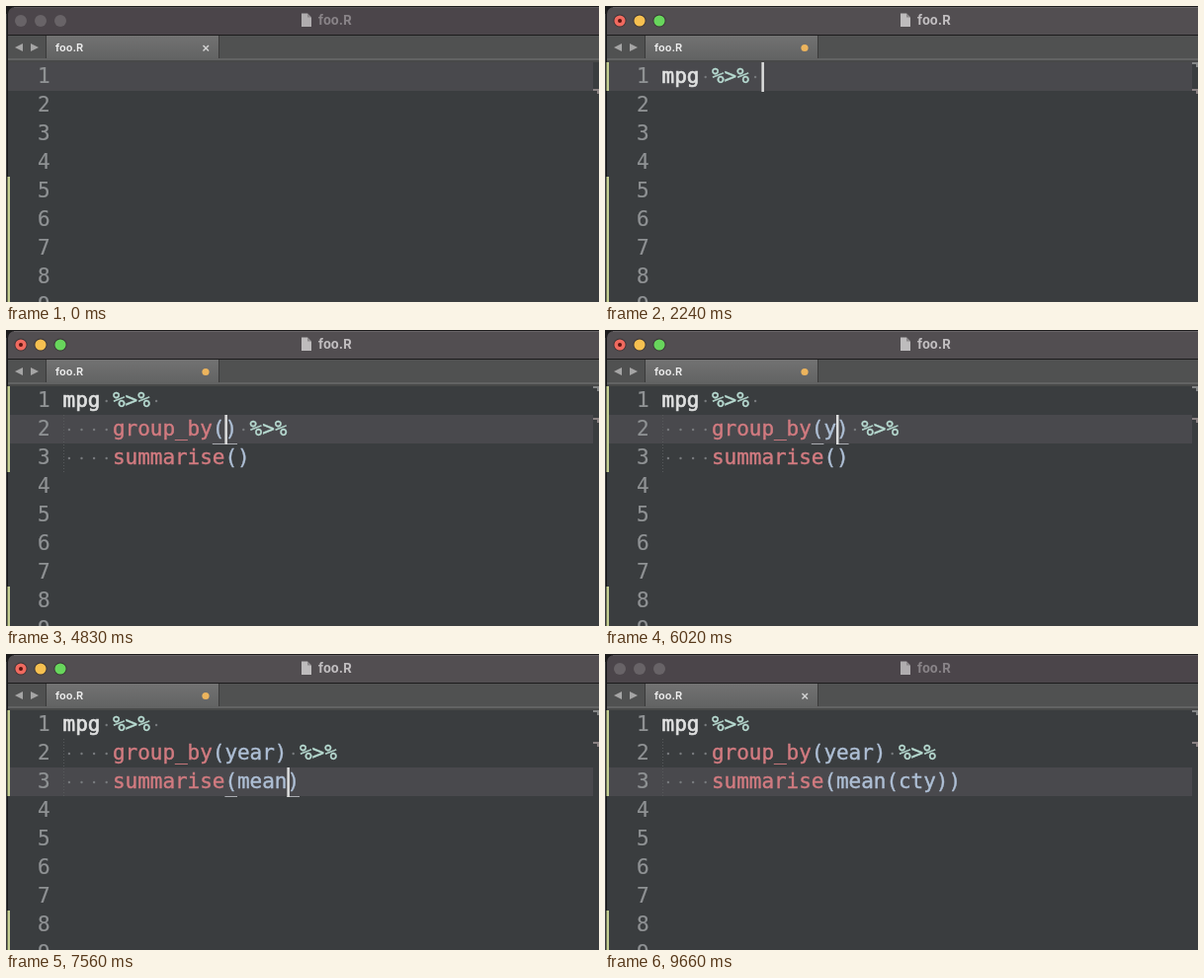
These frames come from a looping animation (600x300 px, 9870 ms). An HTML page with a canvas:

```html
<!DOCTYPE html>
<html>
<head>
<meta charset="utf-8">
<style>
html, body { margin: 0; width: 100%; height: 100%; overflow: hidden; background: #3a3d3f; }
canvas { display: block; }
</style>
</head>
<body>
<canvas width="600" height="300"></canvas>
<script>
const ctx = document.querySelector('canvas').getContext('2d');
const LOOP = 9870, LEFT = 57.6, TOP = 57, CHAR = 12.6, ROW = 29, BASE = 20.7;
const EDIT = 1540, SAVE = 8960, BLUR = 9520;
const MONO = '21px "DejaVu Sans Mono", monospace';

// Editor states: time, text with "|" as the caret
const pipe = 'mpg %>% \n';
const group = arg => pipe + `    group_by(${arg}) %>%\n    summarise()`;
const sum = arg => pipe + `    group_by(year) %>%\n    summarise(${arg})`;
const states = [
  [0, '|'],
  [1540, 'm|'], [1680, 'mp|'], [1820, 'mpg|'], [2170, 'mpg %>% |'],
  [2660, pipe + '|'], [3010, pipe + '    |'],
  [4060, pipe + '    r|'], [4270, pipe + '    rg|'], [4550, pipe + '    rgs|'],
  [4830, group('|')], [5880, group('y|')], [6090, group('ye|')], [6160, group('year|')],
  [6440, sum('') + '|'], [6790, sum('|')],
  [7280, sum('m|')], [7350, sum('me|')], [7420, sum('mea|')], [7560, sum('mean|')],
  [7700, sum('mean(|)')],
  [8050, sum('mean(c|)')], [8190, sum('mean(ct|)')], [8330, sum('mean(cty|)')],
  [SAVE, sum('mean(cty|)').replace(' \n', '\n')]
];

const rect = (color, x, y, w, h) => { ctx.fillStyle = color; ctx.fillRect(x, y, w, h); };
const disc = (color, x, y, r) => {
  ctx.fillStyle = color;
  ctx.beginPath();
  ctx.arc(x, y, r, 0, 7);
  ctx.fill();
};
const poly = (color, ...points) => {
  ctx.fillStyle = color;
  ctx.beginPath();
  for (let i = 0; i < points.length; i += 2) ctx.lineTo(points[i], points[i + 1]);
  ctx.fill();
};
const text = (color, font, s, x, y, weight = 0) => {
  ctx.fillStyle = ctx.strokeStyle = color;
  ctx.font = font;
  ctx.fillText(s, x, y);
  ctx.lineWidth = weight;
  if (weight) ctx.strokeText(s, x, y);
};
const mix = (a, b, k) => `rgb(${a.map((v, i) => v + (b[i] - v) * k)})`;
const colX = col => LEFT + col * CHAR;
const rowY = row => TOP + row * ROW;

function drawTitle(active, edited) {
  rect('#1c1b1c', 0, 0, 600, 30);
  ctx.fillStyle = mix([75, 69, 74], [82, 78, 81], active);
  ctx.beginPath();
  ctx.roundRect(2, 1, 610, 28, [7, 0, 0, 0]);
  ctx.fill();
  rect(mix([92, 87, 91], [104, 100, 103], active), 8, 1, 592, 1);
  [[240, 106, 95], [246, 192, 80], [104, 214, 92]].forEach((c, i) => {
    const x = 15 + 20 * i;
    disc(`rgba(40,34,36,${active * .6})`, x, 15, 6.5);
    disc(mix([104, 99, 103], c, active), x, 15, 6 - active * .4);
  });
  if (edited) disc(`rgba(90,20,15,${active})`, 15, 15, 2);
  const page = mix([176, 173, 175], [190, 188, 189], active);
  poly(page, 299, 7.5, 305, 7.5, 309, 11.5, 309, 21, 299, 21);
  poly('#8d8a8c', 305, 7.5, 309, 11.5, 305, 11.5);
  text(mix([137, 132, 136], [194, 191, 193], active), '700 13px Inter, sans-serif', 'foo.R', 316, 19);
}

function drawTabs(edited) {
  rect('#505151', 0, 30, 600, 23);
  const shade = ctx.createLinearGradient(0, 30, 0, 54);
  shade.addColorStop(0, '#727272');
  shade.addColorStop(1, '#626363');
  rect(shade, 41, 30, 174, 24);
  rect('#3a3a3a', 40, 30, 1, 23);
  rect('#3a3a3a', 215, 30, 1, 23);
  rect('#626363', 0, 53, 600, 2);
  rect('#484949', 0, 55, 600, 2);
  poly('#a5a5a5', 17, 38, 17, 46, 9, 42);
  poly('#a5a5a5', 25, 38, 25, 46, 33, 42);
  text('#f0f0f0', '600 11px Inter, sans-serif', 'foo.R', 50, 46);
  if (edited) return disc('#ecb45d', 202, 42.5, 3.6);
  ctx.strokeStyle = '#d2d2d2';
  ctx.lineWidth = 1.5;
  ctx.beginPath();
  ctx.moveTo(199.5, 40); ctx.lineTo(205, 45.5);
  ctx.moveTo(205, 40); ctx.lineTo(199.5, 45.5);
  ctx.stroke();
}

function drawLine(line, row) {
  const y = rowY(row);
  for (const m of line.matchAll(/group_by|summarise|%>%|\w+|./g)) {
    const word = m[0];
    const call = /group_by|summarise/.test(word);
    const plain = !call && /^\w/.test(word) && !line.slice(0, m.index).trim();
    const color = call ? '#d27b80' : plain ? '#e0e1e1' : word == '%>%' ? '#b8dcd2' : '#aebfd5';
    [...word].forEach((ch, i) => {
      const x = colX(m.index + i);
      if (ch == ' ') disc('#777a7d', x + CHAR / 2, y + 15, 1.2);
      else text(color, MONO, ch, x, y + BASE, plain ? .7 : .4);
    });
  }
}

// Columns of the bracket pair next to or around the caret
function brackets(line, col) {
  if (line[col - 1] == ')') return [line.lastIndexOf('(', col), col - 1];
  const open = line.lastIndexOf('(', col - 1), close = line.indexOf(')', col);
  return open < 0 || close < 0 ? [] : [open, close];
}

function draw(t) {
  const ramp = start => Math.floor((t - start) / 70) + 1;
  const active = t < BLUR ? Math.max(0, Math.min(1, ramp(70) / 4)) : Math.max(0, 1 - ramp(BLUR) / 3);
  const edited = t >= EDIT && t < SAVE;
  const source = states.findLast(s => s[0] <= t)[1];
  const before = source.split('|')[0].split('\n');
  const row = before.length - 1, col = before[row].length;
  const lines = source.replace('|', '').split('\n');

  rect('#3a3d3f', 0, 0, 600, 300);
  drawTitle(active, edited);
  drawTabs(edited);

  rect('#49494d', 0, rowY(row), 594, ROW);
  rect('#3c3c3f', 0, 8, 1, 292);
  rect('#161617', 1, 8, 1, 292);
  const marked = lines.filter(s => s).length;
  rect('#c5cf92', 1.5, TOP, 2.5, marked * ROW);
  const rest = rowY([4, 5, 7][lines.length - 1]);
  rect('#c5cf92', 1.5, rest, 2.5, 300 - rest);

  for (let i = 0; i < 9; i++) text('#8f9294', MONO, i + 1, 32, rowY(i) + BASE, .2);
  for (let y = rowY(1); y < rowY(lines.length); y += 3)
    if (lines[1]) rect('#56595b', 58, y, 1, 1);
  lines.forEach(drawLine);

  // Edge of the minimap
  const mark = (color, y) => { rect(color, 594, y, 6, 2); rect(color, 598, y + 2, 2, 3); };
  if (lines[0]) mark('#858788', 57);
  mark('#8b8384', lines.length < 2 ? 84 : lines.length < 3 ? 86 : 89);

  if (t < 70 || t >= BLUR) return;
  for (const b of brackets(lines[row], col)) rect('#a8abb0', colX(b), rowY(row + 1), CHAR, 1);
  rect('#dcdddd', colX(col), rowY(row), 2.5, ROW + 1);
}

function tick() {
  draw(performance.now() % LOOP);
  requestAnimationFrame(tick);
}
tick();
</script>
</body>
</html>
```
